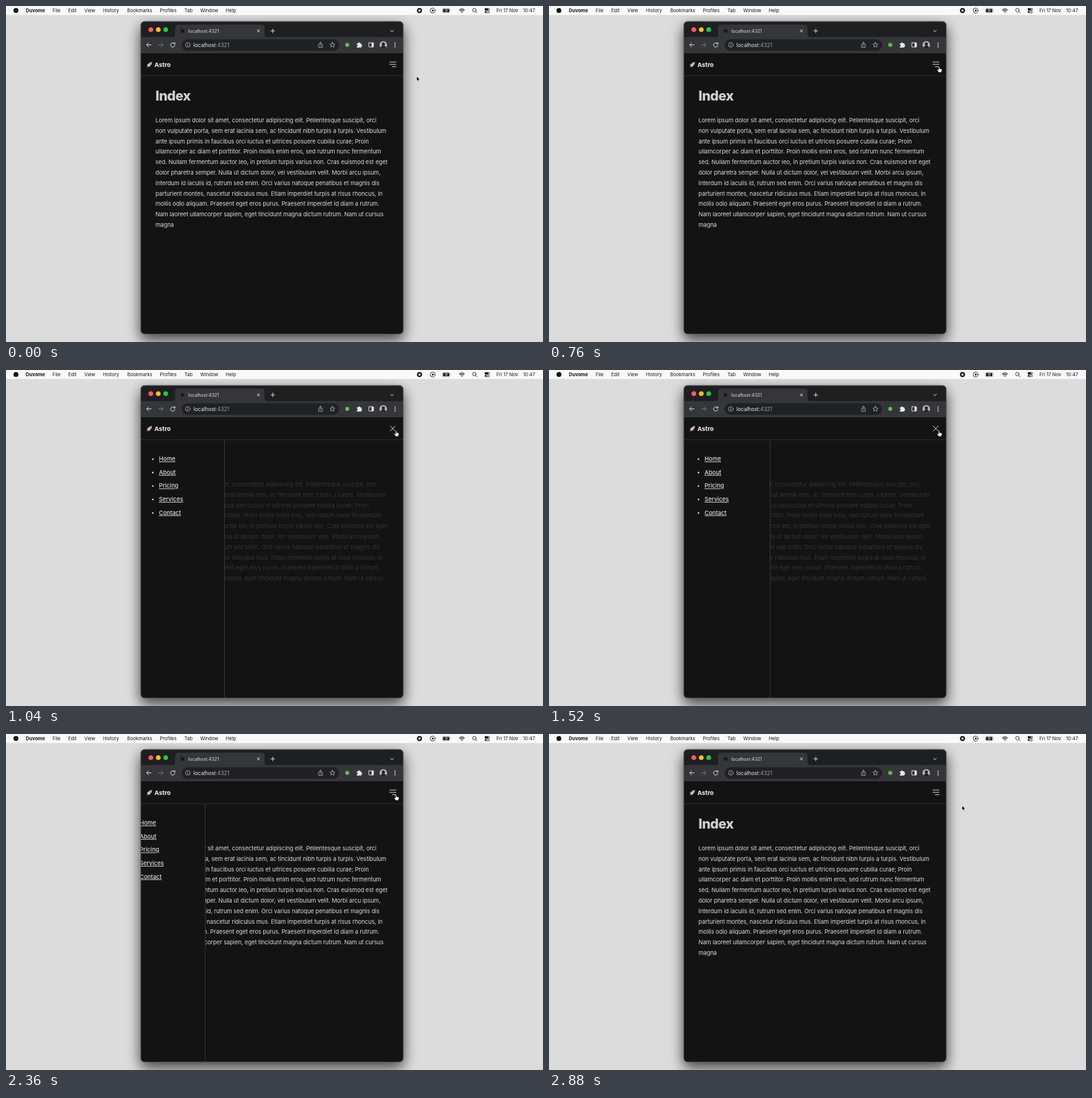
Write an HTML page that moves like this. It is 864 px wide and 540 px high and loops after 2.92 s.

```html
<!DOCTYPE html>
<html lang="en">
<head>
<meta charset="utf-8">
<title>Mobile menu demo</title>
<style>
  html, body { margin: 0; width: 100%; height: 100%; overflow: hidden; background: #dcdcdc; }
  svg { display: block; width: 864px; height: 540px; font-family: Inter, "Open Sans", sans-serif; }
  text { white-space: pre; }
  .line { fill: none; stroke-linecap: round; stroke-linejoin: round; }
  #frame { filter: drop-shadow(0 9px 11px rgba(0, 0, 0, .55)) drop-shadow(0 0 1px rgba(0, 0, 0, .5)); }
  #menubar { font-size: 7.6px; fill: #161616; }
  #body { font-size: 9.3px; letter-spacing: -.055px; fill: #dadad8; }
  #links { font-size: 9.4px; font-weight: 500; fill: #dededc; }
  #links text { text-decoration: underline; }
</style>
</head>
<body>
<svg viewBox="0 0 864 540">
  <defs>
    <clipPath id="window"><rect x="217" y="25" width="422" height="502" rx="6"/></clipPath>
  </defs>
  <rect width="864" height="540" fill="#dcdcdc"/>
  <rect id="frame" x="217" y="25" width="422" height="502" rx="6" fill="#131313"/>

  <g clip-path="url(#window)">
    <!-- page -->
    <g id="content">
      <text x="240.5" y="152" font-size="21.6" font-weight="800" letter-spacing="-.54" fill="#d0d0cc">Index</text>
      <g id="body"></g>
    </g>
    <g id="panel">
      <path d="M217 112h139v415H217z" fill="#131313"/>
      <path d="M355.7 112v415" stroke="#434343" stroke-width=".8"/>
      <g id="links"></g>
    </g>

    <!-- page header -->
    <path d="M217 76h422v36H217z" fill="#131313"/>
    <path d="M217 112h422" stroke="#3a3a3a" stroke-width=".8"/>
    <g transform="translate(231 94) rotate(45)">
      <path d="M-2 1-3.6 3.6-1.5 3.2ZM2 1 3.6 3.6 1.5 3.2Z" fill="#d3453c"/>
      <path d="M-1.2 3.4h2.4L0 6.4Z" fill="#f5a33b"/>
      <path d="M0-5.6C2.6-3 2.5 .8 1.5 3.4h-3C-2.5 .8-2.6-3 0-5.6Z" fill="#c9d0d6"/>
      <path d="M0-5.6 1.4-3.7h-2.8Z" fill="#d3453c"/>
      <circle cy="-1.4" r="1" fill="#3f7fa8"/>
    </g>
    <text x="238.8" y="97.5" font-size="9.6" font-weight="800" fill="#dededc">Astro</text>
    <g class="line" stroke="#dcdcda" stroke-width="1">
      <path id="burger" d="M617.5 90h10M617.5 93.8h10M621.3 97.6h6.2"/>
      <path id="cross" d="M618.3 90l8 8M626.3 90l-8 8"/>
    </g>

    <!-- tab strip and toolbar -->
    <path d="M217 25h422v26H217z" fill="#1d1f21"/>
    <path d="M217 50h422v26H217z" fill="#343639"/>
    <path d="M267 50.5q5 0 5-5V35q0-5 5-5h134q5 0 5 5v10.5q0 5 5 5z" fill="#343639"/>
    <circle cx="233" cy="38" r="3.8" fill="#fe5f57"/>
    <circle cx="245" cy="38" r="3.8" fill="#febc2e"/>
    <circle cx="257" cy="38" r="3.8" fill="#28c840"/>
    <circle cx="284" cy="40" r="3" fill="#17181c"/>
    <text x="293.3" y="42.5" font-size="7.2" fill="#dfe1e5">localhost:4321</text>
    <rect x="282.5" y="53.5" width="253.5" height="18.5" rx="9.2" fill="#202124"/>
    <text x="301.8" y="65.7" font-size="8.4" fill="#e8eaed">localhost<tspan fill="#9aa0a6">:4321</tspan></text>
    <g class="line" stroke="#dfe1e5" stroke-width="1">
      <path d="M404.4 38.2l3.6 3.6M408 38.2l-3.6 3.6M426 40h6.4M429.2 36.8v6.4M618.6 39l2.4 2.3 2.4-2.3"/>
      <path d="M233.5 62.5h-7M229.5 59.2l-3.3 3.3 3.3 3.3"/>
      <path d="M245.5 62.5h7M249.5 59.2l3.3 3.3-3.3 3.3" stroke="#777a7e"/>
      <path d="M271 60.3a3.5 3.5 0 1 0 .8 2.9M271.9 58.7v2.3h-2.4"/>
      <g stroke="#bdc1c6" stroke-width=".8">
        <circle cx="292.5" cy="62.5" r="3.7"/>
        <path d="M292.5 62.3v2M292.5 60.6v.1"/>
        <path d="M504.4 61.2h-1.3v5.3h5.8v-5.3h-1.3M506 64v-5.8M504.4 59.6l1.6-1.6 1.6 1.6"/>
        <path d="M525.2 58.3l1.2 2.7 2.9.3-2.2 1.9.7 2.9-2.6-1.5-2.6 1.5.7-2.9-2.2-1.9 2.9-.3z"/>
      </g>
      <rect x="583.8" y="59" width="7.4" height="7" rx=".5"/>
    </g>
    <circle cx="549" cy="62.5" r="3.2" fill="#62bd4c"/>
    <g fill="#e8eaed">
      <path d="M564.5 60h2.2a1.4 1.4 0 1 1 2.8 0h2.2v2.3a1.4 1.4 0 1 1 0 2.8v1.7h-7.2v-2a1.4 1.4 0 1 0 0-2.8z"/>
      <path d="M588.2 59h3v7h-3z"/>
      <circle cx="626" cy="59.5" r=".9"/><circle cx="626" cy="62.5" r=".9"/><circle cx="626" cy="65.5" r=".9"/>
    </g>
    <circle cx="607" cy="62.5" r="6" fill="#c3b5ac"/>
    <path d="M602.7 66.7q.8-3 3-3.3a2.7 2.7 0 1 1 2.8 0q2.2.3 3 3.3a6 6 0 0 1-8.8 0z" fill="#2a2729"/>
  </g>
  <rect x="217" y="25" width="422" height="502" rx="6" fill="none" stroke="#585858" stroke-width=".7"/>

  <!-- menu bar -->
  <path d="M0 0h864v14.5H0z" fill="#f9f9f9"/>
  <g id="menubar">
    <circle cx="16" cy="7.2" r="3.9"/>
    <text x="32" y="10" font-weight="700">Duvome</text>
  </g>
  <g fill="#161616">
    <circle cx="665.3" cy="7.3" r="4.1"/>
    <rect x="663.7" y="5.7" width="3.2" height="3.2" rx=".4" fill="#f9f9f9"/>
    <path d="M685.5 5.2v4.2l3.5-2.1z"/>
    <rect x="703.2" y="4.7" width="10" height="5.2" rx="1"/>
    <path d="M715.3 6.1q1.3 1.2 0 2.4z" fill="#777"/>
    <path d="M709.4 3l-3.3 4.9h2.1l-.8 3.7 3.3-5h-2.1z" stroke="#f9f9f9" stroke-width=".6"/>
    <path d="M733.5 11l-1.3-1.5q1.3-1 2.6 0z"/>
    <rect x="770" y="3.6" width="8.2" height="3.3" rx="1.65"/>
    <circle cx="776.4" cy="5.25" r="1" fill="#f9f9f9"/>
  </g>
  <g class="line" stroke="#161616" stroke-width=".9">
    <circle cx="686.5" cy="7.3" r="4"/>
    <rect x="702.2" y="3.7" width="12" height="7.2" rx="1.8" stroke="#888" stroke-width=".6"/>
    <path d="M729.4 6.3q4.1-3.6 8.2 0M730.9 8q2.6-2.2 5.2 0" stroke-width="1.1"/>
    <circle cx="753.5" cy="6.6" r="2.8"/><path d="M755.6 8.7l2.3 2.3"/>
    <rect x="770.4" y="8.2" width="7.4" height="2.6" rx="1.3"/>
    <circle cx="772" cy="9.5" r=".6"/>
  </g>

  <!-- pointer, tip at 0,0 -->
  <g id="pointer" stroke-linejoin="round">
    <path id="arrow" d="M0 0v7.8l1.8-1.7 1.3 3 1.3-.6-1.3-2.9h2.5z" fill="#000" stroke="#fff" stroke-width=".7"/>
    <path id="hand" d="M-.8 .6q.8-1.2 1.6 0v3q.8-.6 1.4 .1 .8-.4 1.3 .3 1.2-.3 1.3 .8 .1 2.3-.9 3.7v1H-.7q-.4-1.3-1.6-2.6-1.2-1.6-.6-2 .9-.5 2.1 .9z" fill="#fff" stroke="#000" stroke-width=".6"/>
  </g>
</svg>

<script>
const LOOP = 2920, STEP = 40;
const OPEN_AT = 806, CLOSE_AT = 2283, SLIDE_MS = 300, PANEL_WIDTH = 139.5;

const $ = id => document.getElementById(id);

function addText(parent, x, y, content) {
  const el = document.createElementNS("http://www.w3.org/2000/svg", "text");
  el.setAttribute("x", x);
  el.setAttribute("y", y);
  el.textContent = content;
  parent.append(el);
}

const menu = { File: 75, Edit: 100, View: 126, History: 156, Bookmarks: 195, Profiles: 247.5,
  Tab: 287, Window: 312.5, Help: 353.5, "Fri 17 Nov": 789, "10:47": 832 };
for (const [label, x] of Object.entries(menu)) addText($("menubar"), x, 10, label);

`Lorem ipsum dolor sit amet, consectetur adipiscing elit. Pellentesque suscipit, orci
non vulputate porta, sem erat lacinia sem, ac tincidunt nibh turpis a turpis. Vestibulum
ante ipsum primis in faucibus orci luctus et ultrices posuere cubilia curae; Proin
ullamcorper ac diam et porttitor. Proin mollis enim eros, sed rutrum nunc fermentum
sed. Nullam fermentum auctor leo, in pretium turpis varius non. Cras euismod est eget
dolor pharetra semper. Nulla ut dictum dolor, vel vestibulum velit. Morbi arcu ipsum,
interdum id iaculis id, rutrum sed enim. Orci varius natoque penatibus et magnis dis
parturient montes, nascetur ridiculus mus. Etiam imperdiet turpis at risus rhoncus, in
mollis odio aliquam. Praesent eget eros purus. Praesent imperdiet id diam a rutrum.
Nam laoreet ullamcorper sapien, eget tincidunt magna dictum rutrum. Nam ut cursus
magna`.split("\n").forEach((line, i) => addText($("body"), 240.5, 187 + i * 16.8, line));

["Home", "About", "Pricing", "Services", "Contact"].forEach((label, i) => {
  const y = 146.2 + i * 21.6;
  addText($("links"), 250.3, y, label);
  $("links").insertAdjacentHTML("beforeend", `<circle cx="240.5" cy="${y - 2.9}" r="1.3"/>`);
});

const clamp = x => Math.min(1, Math.max(0, x));
const bezier = (a, b, s) => 3 * (1 - s) ** 2 * s * a + 3 * (1 - s) * s * s * b + s ** 3;

// cubic-bezier(.4, 0, .2, 1)
function ease(x) {
  x = clamp(x);
  if (x === 0 || x === 1) return x;
  let low = 0, high = 1;
  for (let i = 0; i < 20; i++) {
    const mid = (low + high) / 2;
    if (bezier(.4, .2, mid) < x) low = mid; else high = mid;
  }
  return bezier(0, 1, high);
}

const smooth = x => { x = clamp(x); return x * x * (3 - 2 * x); };
const show = (id, on) => $(id).setAttribute("visibility", on ? "visible" : "hidden");
const move = (id, x, y) => $(id).setAttribute("transform", `translate(${x} ${y})`);

function draw(now) {
  const t = Math.floor(now % LOOP / STEP) * STEP;
  const open = t >= OPEN_AT && t < CLOSE_AT;
  const slide = ease((t - OPEN_AT) / SLIDE_MS) - ease((t - CLOSE_AT) / SLIDE_MS);
  move("panel", (slide - 1) * PANEL_WIDTH, 0);
  $("content").setAttribute("opacity", open ? .16 : 1);
  show("burger", !open);
  show("cross", open);

  const arrive = smooth((t - 40) / 480), leave = smooth((t - 2500) / 380);
  const x = 660.7 - 33.2 * arrive + 37 * leave;
  const y = 113 - 15.7 * arrive + 17.7 * leave;
  move("pointer", x, y);
  show("hand", x < 632);
  show("arrow", x >= 632);
  requestAnimationFrame(draw);
}
requestAnimationFrame(draw);
</script>
</body>
</html>
```
